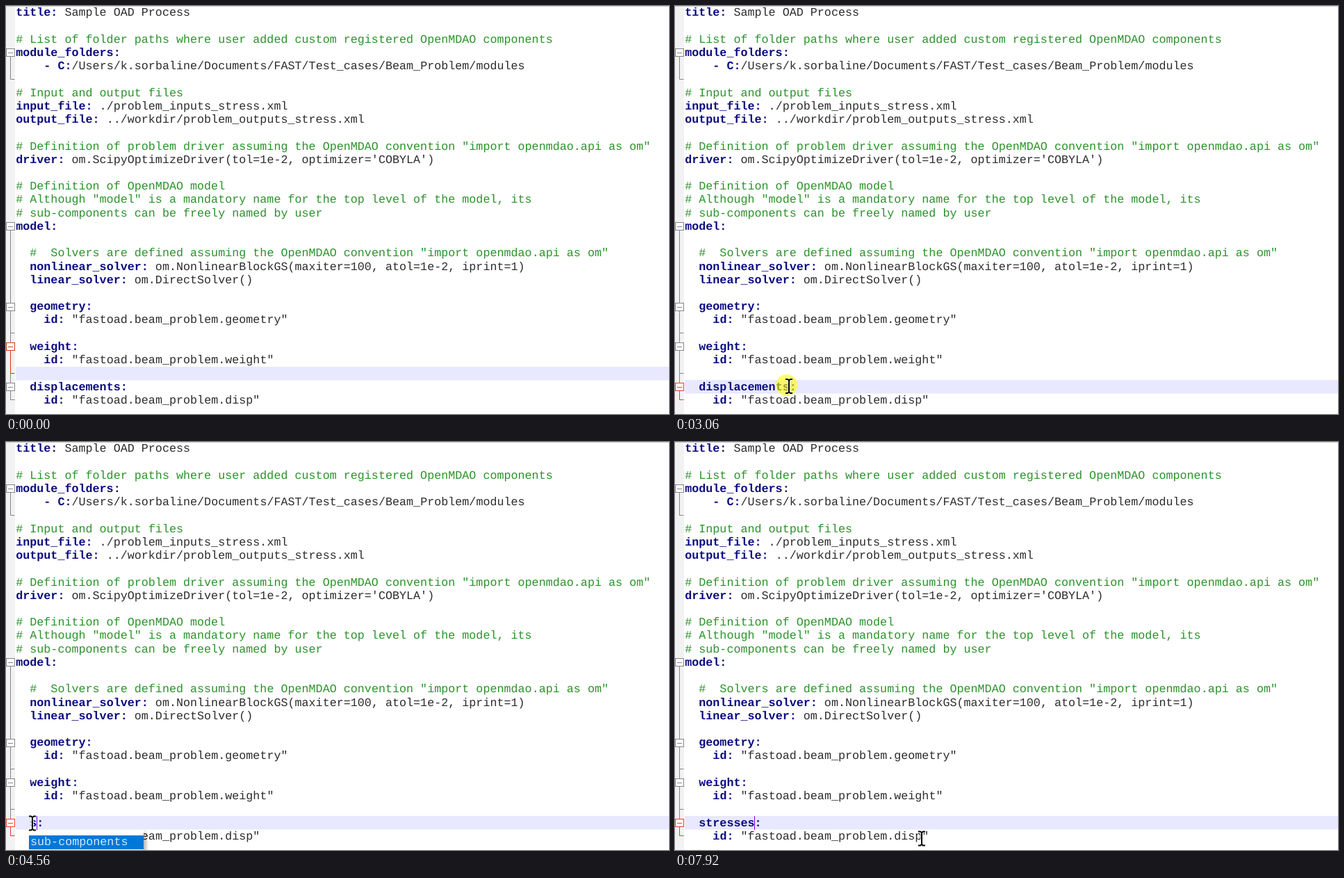
Write an HTML page that moves like this. It is 954 px wide and 587 px high and loops after 8000 ms.

```html
<!DOCTYPE html>
<html lang="en">
<head>
<meta charset="utf-8">
<title>Editing a YAML file</title>
<style>
  html, body { margin: 0; width: 100%; height: 100%; overflow: hidden; background: #fff; }
  svg { display: block; width: 954px; height: 587px; }
  text { font: 16.733px "Liberation Mono", monospace; white-space: pre; text-rendering: geometricPrecision; fill: #2c2c2c; }
  .key { font-weight: bold; fill: #0c0c80; }
  .comment { fill: #2a932a; }
  .fold { fill: none; stroke: #858585; }
  .fold rect { fill: #fff; }
  #popup { filter: drop-shadow(4px 3px 2px #0004); }
</style>
</head>
<body>
<svg viewBox="0 0 954 587">
  <defs><path id="beam" d="M-5-10H-2L0-8.5 2-10H5M0-9V9M-5 10H-2L0 8.5 2 10H5"/></defs>
  <rect width="954" height="587" fill="#fff"/>
  <rect width="13" height="587" fill="#f2f2f2"/>
  <rect width="954" height="1" fill="#c8c8c8"/>
  <rect id="current" x="14" width="940" height="19.5" fill="#e8e8ff"/>
  <rect id="selection" y="538" height="19.5" fill="#c0c0c0"/>
  <g id="folds"></g>
  <g id="lines"></g>
  <rect id="caret" y="538" width="1" height="20" fill="#8000ff"/>
  <g id="popup">
    <rect x="33" y="559" width="165" height="28" fill="#fff"/>
    <rect x="33" y="566" width="165" height="20" fill="#0078d7"/>
    <text x="35" y="580.4" style="fill:#d4e8f9">sub-components</text>
  </g>
  <circle id="press" r="15.5" fill="#ffff00" fill-opacity=".6"/>
  <g id="pointer" fill="none">
    <use href="#beam" stroke="#fff" stroke-width="3.5"/>
    <use href="#beam" stroke="#000" stroke-width="2"/>
  </g>
</svg>
<script>
const LOOP = 8000, TICK = 93.5, LEFT = 14.2, PITCH = 10.04, ROW = 19.22, EDIT_ROW = 28;
const $ = id => document.getElementById(id);
const clamp = (value, low, high) => Math.max(low, Math.min(high, value));
const columnX = col => LEFT + col * PITCH;

const source = `title: Sample OAD Process

# List of folder paths where user added custom registered OpenMDAO components
module_folders:
    - C:/Users/k.sorbaline/Documents/FAST/Test_cases/Beam_Problem/modules

# Input and output files
input_file: ./problem_inputs_stress.xml
output_file: ../workdir/problem_outputs_stress.xml

# Definition of problem driver assuming the OpenMDAO convention "import openmdao.api as om"
driver: om.ScipyOptimizeDriver(tol=1e-2, optimizer='COBYLA')

# Definition of OpenMDAO model
# Although "model" is a mandatory name for the top level of the model, its
# sub-components can be freely named by user
model:

  #  Solvers are defined assuming the OpenMDAO convention "import openmdao.api as om"
  nonlinear_solver: om.NonlinearBlockGS(maxiter=100, atol=1e-2, iprint=1)
  linear_solver: om.DirectSolver()

  geometry:
    id: "fastoad.beam_problem.geometry"

  weight:
    id: "fastoad.beam_problem.weight"

  displacements:
    id: "fastoad.beam_problem.disp"`;
const rows = source.split('\n');

function lineMarkup(line, row) {
  const [, indent, key = '', rest] = line.match(/^( *)(\w+:|- C:)?(.*)$/);
  const style = rest.startsWith('#') ? 'comment' : 'plain';
  return `<text id="row${row}" x="${columnX(indent.length)}" y="${14.4 + row * ROW}">` +
    `<tspan class="key">${key}</tspan><tspan class="${style}">${rest}</tspan></text>`;
}
$('lines').innerHTML = rows.map(lineMarkup).join('');
const editedKey = $('row' + EDIT_ROW).firstChild;

// A key without a value folds up to the next blank row; a top-level model spans the rest.
function foldMarkup(line, row) {
  const key = line.match(/^ *(\w+):$/)?.[1];
  if (!key) return '';
  const blank = rows.indexOf('', row + 1);
  const last = key === 'model' || blank < 0 ? rows.length - 1 : blank;
  const y = Math.round(9.8 + row * ROW), end = Math.floor(9.5 + last * ROW) + .5;
  return `<g class="fold" id="fold-${key}"><path d="M6.5 ${y}V${end}H12.5"/>
    <rect x=".5" y="${y - 5.5}" width="12" height="11"/><path d="M3 ${y + .5}H10"/></g>`;
}
$('folds').innerHTML = rows.map(foldMarkup).join('');

const easeIn = u => u ** 3.5;
const easeOut = u => 1 - (1 - u) ** 2.2;
const easeInOut = u => u * u * (3 - 2 * u);
const moves = [
  { start: 720, end: 1468, x: 249, y: 547, ease: easeIn },
  { start: 1468, end: 1842, x: 115, y: 540, ease: easeOut },
  { start: 1842, end: 2590, x: 164, y: 547, ease: easeInOut },
  { start: 3057, end: 3805, x: 38, y: 548.5, ease: easeOut },
  { start: 6704, end: 7359, x: 371, y: 576, ease: easeInOut },
  { start: 7359, end: 7639, x: 355, y: 572, ease: easeOut },
  { start: 7826, end: 7919, x: 355, y: 570.5, ease: easeOut }
];
function pointerAt(time) {
  let x = 555, y = 587;
  for (const move of moves) {
    const u = move.ease(clamp((time - move.start) / (move.end - move.start), 0, 1));
    x += (move.x - x) * u;
    y += (move.y - y) * u;
  }
  return [x, y];
}

// Text typed in bursts, one letter every two ticks
const bursts = [{ start: 4560, text: 's' }, { start: 4840, text: 'tress' }, { start: 6070, text: 'es' }];
const typedAt = t => bursts.map(({ start, text }) =>
  text.slice(0, Math.max(0, Math.floor((t - start) / (2 * TICK)) + 1))).join('');

const show = (id, on) => $(id).setAttribute('visibility', on ? 'visible' : 'hidden');
const place = (id, x, y) => $(id).setAttribute('transform', `translate(${x} ${y})`);

function draw(t) {
  const step = Math.floor((t - 706) / TICK);
  const [x, y] = pointerAt(720 + step * TICK);
  const clicked = t >= 3060;
  const typed = typedAt(t);

  place('pointer', Math.round(x), y);
  show('pointer', step >= 0);
  place('press', x - 3, y - 1.5);
  show('press', clicked && t < 4090);

  $('current').setAttribute('y', clicked ? 538 : 519);
  $('fold-weight').style.stroke = clicked ? '' : '#d23a1e';
  $('fold-displacements').style.stroke = clicked ? '#f03c2c' : '';

  editedKey.textContent = (typed || 'displacements') + ':';
  const dragged = clamp(Math.round((x - LEFT) / PITCH), 2, 15);
  $('selection').setAttribute('x', columnX(dragged));
  $('selection').setAttribute('width', (15 - dragged) * PITCH);
  show('selection', clicked && !typed);

  $('caret').setAttribute('x', Math.floor(columnX(typed ? 2 + typed.length : dragged)));
  show('caret', clicked && (t < 4280 || typed));
  show('popup', typed.length === 1);
}

function frame(now) {
  draw(now % LOOP);
  requestAnimationFrame(frame);
}
draw(0);
requestAnimationFrame(frame);
</script>
</body>
</html>
```
